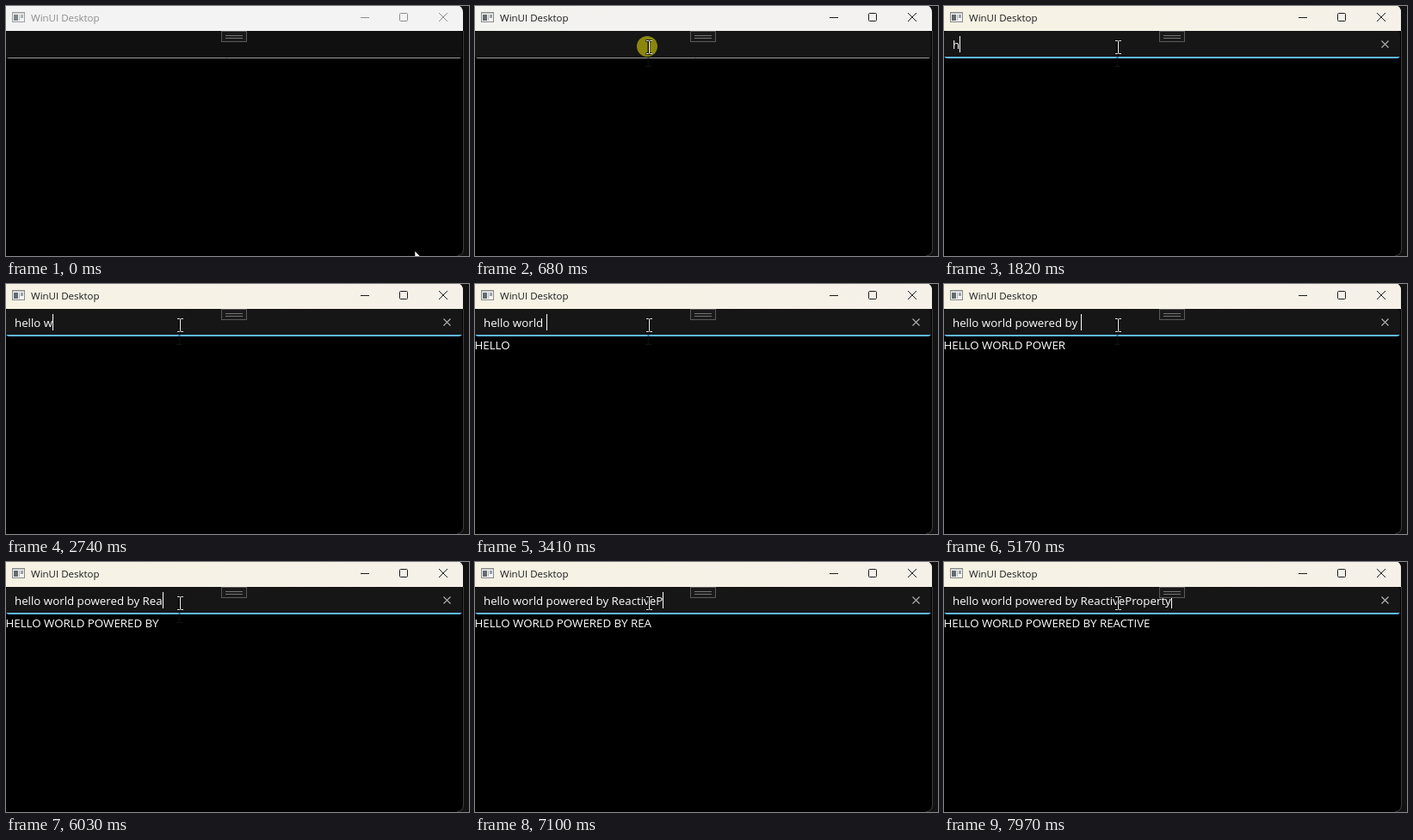
An HTML page that plays this animation: 538x291 px, repeating every 8000 ms.

```html
<!DOCTYPE html>
<html lang="en">
<head>
<meta charset="utf-8">
<title>Live uppercase input</title>
<style>
  html, body { margin: 0; width: 100%; height: 100%; overflow: hidden; background: #121212; }
  svg { display: block; width: 538px; height: 291px; }
  text { font: 13.3px "Open Sans", "Noto Sans", sans-serif; fill: #fff; white-space: pre; }
  .title { font-size: 11.5px; }

  .title, .buttons, .icon, .mica, .field, .focus, .blur, .arrow, .beam, .move, .click, .ghost {
    animation: 8s linear infinite;
  }
  .title { animation-name: title; }
  .buttons { fill: none; stroke: #1c1c1c; animation-name: buttons; }
  .icon { animation-name: icon; }
  .mica { animation-name: mica; }
  .field { fill: #161616; animation-name: field; }
  .focus { animation-name: focus; }
  .blur { animation-name: blur; }
  .move { animation-name: move; }
  .arrow { animation-name: arrow; }
  .beam { animation-name: beam; }
  .click { animation-name: click; }
  .ghost { animation-name: ghost; }

  /* 1% = 80 ms */
  @keyframes title { 0%, 7.6% { fill: #8c8c8c; } 7.61%, 100% { fill: #1a1a1a; } }
  @keyframes buttons { 0%, 7.6% { stroke: #8c8c8c; } 7.61%, 100% { stroke: #1c1c1c; } }
  @keyframes icon { 0%, 7.6% { opacity: .8; } 7.61%, 100% { opacity: 1; } }
  @keyframes mica { 0%, 7.6% { opacity: 0; } 8.5% { opacity: .2; } 10.2%, 100% { opacity: 1; } }
  @keyframes field { 0%, 6.5% { fill: #101010; } 6.51%, 100% { fill: #161616; } }
  @keyframes focus { 0%, 9.3% { opacity: 0; } 9.31%, 100% { opacity: 1; } }
  @keyframes blur { 0%, 9.3% { opacity: 1; } 9.31%, 100% { opacity: 0; } }
  @keyframes move {
    0%, .87% { transform: translate(475px, 285px); animation-timing-function: ease-in-out; }
    7.5%, 100% { transform: translate(202px, 48px); }
  }
  @keyframes arrow { 0%, 6.5% { opacity: 1; } 6.51%, 100% { opacity: 0; } }
  @keyframes beam { 0%, 6.5% { opacity: 0; } 6.51%, 100% { opacity: 1; } }
  @keyframes click { 0%, 7.6% { opacity: 0; } 7.61%, 9.3% { opacity: 1; } 9.31%, 100% { opacity: 0; } }
  @keyframes ghost { 0%, 7.6% { opacity: 0; } 7.61%, 85% { opacity: 1; } 85.01%, 100% { opacity: 0; } }
</style>
</head>
<body>
<svg viewBox="0 0 538 291">
  <defs>
    <linearGradient id="warm">
      <stop stop-color="#f6f3e4"/>
      <stop offset="1" stop-color="#f5f1e9"/>
    </linearGradient>
    <clipPath id="window"><rect x="-10" y="-1" width="541" height="292" rx="8"/></clipPath>
    <clipPath id="box"><rect y="29" width="530" height="32" rx="4"/></clipPath>
    <path id="ibeam" d="M-3.5-7.5h2.5q1 0 1 1q0-1 1-1h2.5M0-6.5V6.5M-3.5 7.5h2.5q1 0 1-1q0 1 1 1h2.5"/>
  </defs>

  <rect width="538" height="291" fill="#121212"/>
  <g clip-path="url(#window)">
    <rect width="531" height="291"/>
    <rect width="531" height="29" fill="#f3f3f3"/>
    <rect class="mica" width="531" height="29" fill="url(#warm)"/>
  </g>
  <path d="M531.5 29V283q0 7-7 7.5" fill="none" stroke="#3c3c3c"/>

  <g class="icon">
    <rect x="7.5" y="7.5" width="14" height="11" fill="#f4f4f4" stroke="#8a8a8a"/>
    <path d="M8 8.5h13" stroke="#c4c4c4"/>
    <rect x="9" y="10" width="5" height="7" fill="#626b70"/>
    <path d="M15.5 10v7" stroke="#b5b5b5"/>
    <rect x="17" y="10" width="3" height="4" fill="#9aa2a6"/>
  </g>
  <text class="title" x="29" y="18">WinUI Desktop</text>
  <g class="buttons">
    <path d="M412 13.5h10M503 8l10 10M513 8l-10 10"/>
    <rect x="457.5" y="8.5" width="9" height="9" rx="1"/>
  </g>

  <g clip-path="url(#box)">
    <rect class="field" y="29" width="531" height="32"/>
    <path class="blur" d="M0 60.5h531" stroke="#9c9c9c"/>
    <path class="focus" d="M0 60h531" stroke="#5fb9f2" stroke-width="2"/>
  </g>
  <text id="input" x="10" y="50"></text>
  <text id="output" x="-0.5" y="76"></text>
  <g class="focus"><rect id="caret" y="35" width="1" height="19" fill="#fff"/></g>
  <path id="clear" d="M508.5 40.5l8 8M516.5 40.5l-8 8" stroke="#b8b8b8" stroke-width="1.1"/>

  <rect x="250.5" y="29.5" width="29" height="12" fill="#1a1a1a" stroke="#5a5a5a"/>
  <path d="M255 34.5h20M255 37.5h20" stroke="#747474"/>

  <use class="ghost" href="#ibeam" x="201.5" y="63" fill="none" stroke="#151515"/>
  <circle class="click" cx="200" cy="47" r="12" fill="#8a860e"/>
  <g class="move">
    <path class="arrow" d="M0 0V16l3.7-3.5 2.5 5.6 2.4-1-2.5-5.5H11.5z" fill="#fff" stroke="#000" stroke-width=".6"/>
    <g class="beam" fill="none">
      <use href="#ibeam" stroke="#000" stroke-width="2.6"/>
      <use href="#ibeam" x=".5" stroke="#f4f4f4"/>
    </g>
  </g>
</svg>
<script>
  const LOOP = 8000;
  const DELAY = 1000;
  const phrase = "hello world powered by ReactiveProperty";
  // Time of each key press, in ms
  const keys = [
    1810, 1940, 2070, 2200, 2400, 2600,
    2730, 2810, 2940, 3000, 3200, 3400,
    3670, 3870, 3940, 4010, 4140, 4340, 4540, 4610,
    4880, 5020, 5160,
    5560, 5690, 5890, 6220, 6420, 6620, 6820, 6950,
    7090, 7220, 7290, 7420, 7560, 7690, 7830, 7950
  ];
  const [input, output, caret, clear] =
    ["input", "output", "caret", "clear"].map(id => document.getElementById(id));
  const start = performance.now();

  const typedAt = time => phrase.slice(0, keys.filter(key => key <= time).length);

  function setText(node, value) {
    if (node.textContent !== value) node.textContent = value;
  }

  function draw() {
    const time = (performance.now() - start) % LOOP;
    const typed = typedAt(time);
    setText(input, typed);
    setText(output, typedAt(time - DELAY).toUpperCase());
    const width = typed ? input.getComputedTextLength() : 0;
    caret.setAttribute("x", Math.round(10 + width));
    clear.style.opacity = typed ? 1 : 0;
    requestAnimationFrame(draw);
  }
  draw();
</script>
</body>
</html>
```
